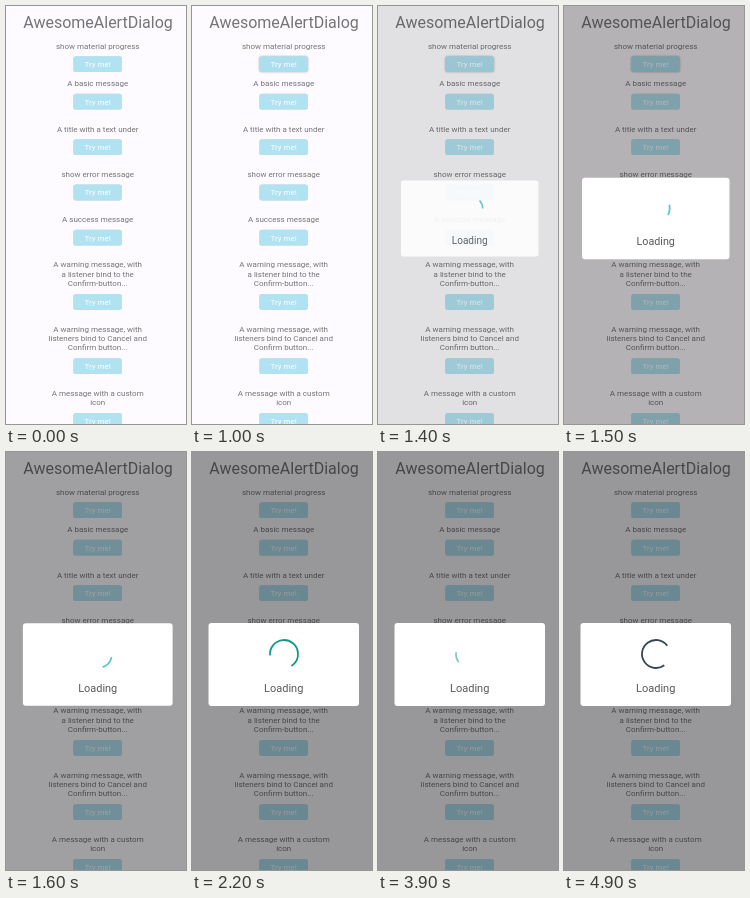
Animation, 180 px wide and 418 px high, one loop 5000 ms. Source, as an HTML page:

```html
<!DOCTYPE html>
<html lang="en">
<head>
<meta charset="utf-8">
<title>AwesomeAlertDialog</title>
<style>
  html, body { margin: 0; width: 100%; height: 100%; overflow: hidden; background: #fdfbff; }
  svg { display: block; }
  text { font: 8px Roboto, sans-serif; fill: #757575; text-anchor: middle; }
  .title { font-size: 16px; }
  .button rect { fill: #b1e2f1; filter: drop-shadow(0 .6px .5px rgba(0, 0, 0, .16)); }
  .button text { fill: #fff; }
  .pressed rect { fill: #addeed; filter: drop-shadow(0 .8px .9px rgba(0, 0, 0, .28)); }
  .loading { font-size: 11px; fill: #595959; }
</style>
</head>
<body>
<svg id="stage" width="180" height="418" viewBox="0 0 180 418">
  <text class="title" x="92" y="22">AwesomeAlertDialog</text>
  <g id="list"></g>
  <rect id="dim" width="180" height="418"/>
  <g id="dialog">
    <rect x="16.5" y="171" width="150.5" height="83" rx="3" fill="#fff"/>
    <circle id="wheel" cx="92" cy="202" r="14" fill="none" stroke-width="1.8" pathLength="360"/>
    <text class="loading" x="91.7" y="240">Loading</text>
  </g>
</svg>
<script>
const $ = id => document.getElementById(id);
const LOOP = 5000, STEP = 100, PRESS = 1000, OPEN = 1300;
const LINE = 9.4, CENTER = 91.7;

// [baseline of the first line, button top, lines]
const entries = [
  [42.6, 50.3, 'show material progress'],
  [80.2, 87.8, 'A basic message'],
  [125.6, 133.2, 'A title with a text under'],
  [170.9, 178.6, 'show error message'],
  [216.1, 223.8, 'A success message'],
  [261.3, 288.1, 'A warning message, with', 'a listener bind to the', 'Confirm-button...'],
  [325.5, 352.2, 'A warning message, with', 'listeners bind to Cancel and', 'Confirm button...'],
  [389.8, 407, 'A message with a custom', 'icon'],
];
$('list').innerHTML = entries.map(([y, top, ...lines]) =>
  lines.map((line, i) => `<text x="${CENTER}" y="${y + i * LINE}">${line}</text>`).join('') +
  `<g class="button"><rect x="67.3" y="${top}" width="48.6" height="15.8" rx="2.6"/>
   <text x="${CENTER}" y="${top + 10.8}">Try me!</text></g>`
).join('');
const firstButton = document.querySelector('.button');

// Opening pose per step; the last value holds
const dimming = [0, .11, .29, .37, .39, .4];
const scales = [.7, .914, .98, .995, 1];
const alphas = [.22, .9, 1];
const hold = (list, i) => list[Math.min(i, list.length - 1)];

// Wheel: constant spin, while the arc grows from its head and shrinks from its tail
const SPIN = .27, MIN = 40, EXTRA = 230, PAUSE = 200, EASE = 1000, WHEEL_START = 1220;
const colors = ['#58c5d3', '#10998a', '#a5dc86', '#80cbc4', '#37474f'];
const COLOR_TIME = 800;

function drawWheel(t) {
  const age = t - WHEEL_START;
  const half = PAUSE + EASE;
  const phase = Math.floor(age / half);
  const p = Math.max(0, age % half - PAUSE) / EASE;
  const eased = (1 - Math.cos(p * Math.PI)) / 2;
  const shrinking = phase % 2 === 1;
  const length = MIN + EXTRA * (shrinking ? 1 - eased : eased);
  const shrunk = Math.floor(phase / 2) + (shrinking ? eased : 0);
  const tail = -90 + SPIN * age + EXTRA * shrunk;
  const wheel = $('wheel');
  wheel.setAttribute('stroke', hold(colors, Math.floor((t - OPEN) / COLOR_TIME)));
  wheel.setAttribute('stroke-dasharray', `${length} ${360 - length}`);
  wheel.setAttribute('transform', `rotate(${tail} 92 202)`);
}

function draw(t) {
  const open = t >= OPEN;
  const step = (t - OPEN) / STEP;
  firstButton.classList.toggle('pressed', t >= PRESS && t < OPEN + 3 * STEP);
  $('dim').setAttribute('opacity', open ? hold(dimming, step) : 0);
  $('dialog').setAttribute('opacity', open ? hold(alphas, step) : 0);
  if (!open) return;
  const scale = hold(scales, step);
  $('dialog').setAttribute('transform',
    `translate(91.75 212.5) scale(${scale}) translate(-91.75 -212.5)`);
  drawWheel(t);
}

function tick() {
  draw(Math.floor(performance.now() % LOOP / STEP) * STEP);
  requestAnimationFrame(tick);
}
tick();
</script>
</body>
</html>
```
